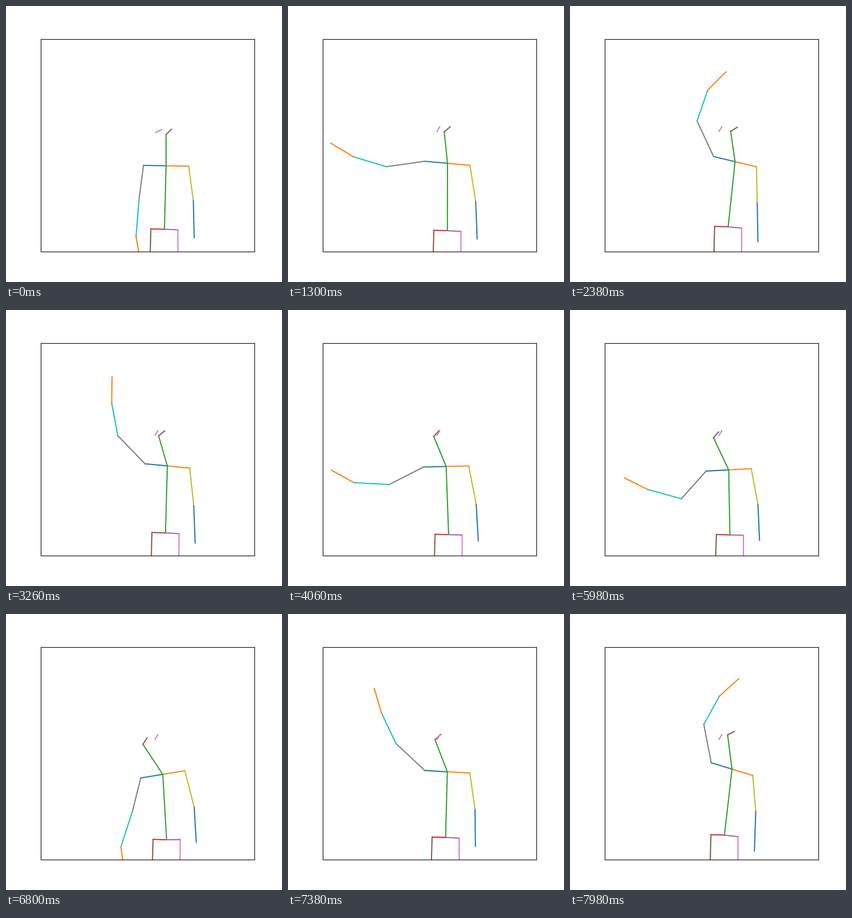
Recreate the animation shown at these times as an HTML page with a canvas. Size 500 by 500 pixels, loop 8000 ms.

```html
<!DOCTYPE html>
<html lang="en">
<head>
<meta charset="utf-8">
<title>Skeleton motion</title>
<style>
  html, body { margin: 0; width: 100%; height: 100%; overflow: hidden; background: #fff; }
  canvas { display: block; width: 100%; height: 100%; }
</style>
</head>
<body>
<canvas id="stage" width="500" height="500"></canvas>
<script>
const ctx = document.getElementById('stage').getContext('2d');
const LOOP = 8000, STEP = 20, FLOOR = 450;
const BLUE = '#1f77b4', ORANGE = '#ff7f0e', GREEN = '#2ca02c', RED = '#d62728',
      PURPLE = '#9467bd', BROWN = '#8c564b', PINK = '#e377c2', GRAY = '#7f7f7f',
      OLIVE = '#bcbd22', CYAN = '#17becf';

const rad = deg => deg * Math.PI / 180;
const shift = ([x, y], dx, dy) => [x + dx, y + dy];

// Monotone cubic through (times, values), at rest at both ends.
function curve(times, values) {
  const last = times.length - 1;
  const slope = i => (values[i + 1] - values[i]) / (times[i + 1] - times[i]);
  const tangent = times.map((_, i) => {
    if (i === 0 || i === last) return 0;
    const a = slope(i - 1), b = slope(i);
    return a * b <= 0 ? 0 : 2 * a * b / (a + b);
  });
  return t => {
    let i = 0;
    while (i < last - 1 && t >= times[i + 1]) i++;
    const h = times[i + 1] - times[i];
    const u = Math.min(1, Math.max(0, (t - times[i]) / h)), v = 1 - u;
    return v * v * (1 + 2 * u) * values[i] + u * u * (3 - 2 * u) * values[i + 1]
         + h * u * v * (v * tangent[i] - u * tangent[i + 1]);
  };
}

// Key poses of the trunk; every other trunk joint follows from these.
const POSES = [0, 1300, 2380, 4060, 5160, 6800, 7980];
const track = (...values) => curve(POSES, values);
const hipX = track(287, 288.8, 286.5, 291, 288.3, 291, 279.8);
const hipY = track(404.5, 407, 400, 407, 406, 409, 400.5);
const neckX = track(290, 289, 299, 286.5, 291, 284, 293.5);
const neckY = track(289.5, 285, 282, 283.5, 288, 290.5, 281);
const headX = track(290, 283, 291, 264, 272, 248, 285.5);
const headY = track(233, 228, 227, 229, 227, 236, 219);
const roll = track(1, 5.2, 13.4, -1.4, 3.5, -9.4, 16.8);
const settle = curve([0, 1300], [0, 1]);

// Waving arm: time, then angles of upper arm, forearm and hand
// (0 down, 90 out to the side, 180 up).
const ARM = [
  [0, 7.4, 4.7, -9.5],
  [820, 25, 34, 34],
  [1300, 82, 107, 121],
  [1640, 128, 154, 162],
  [2380, 155, 199, 225],
  [3290, 135, 168, 179],
  [4060, 63, 93, 119],
  [4900, 60, 103, 128],
  [5160, 59, 147, 172],
  [5500, 57, 146, 172],
  [6800, 14, 18, -8],
  [7390, 134, 156, 165],
  [7980, 169, 209, 228]
];
const armTimes = ARM.map(key => key[0]);
const [upperArm, forearm, handTurn] = [1, 2, 3].map(c => curve(armTimes, ARM.map(key => key[c])));

const bone = (from, angle, length) =>
  shift(from, -Math.sin(rad(angle)) * length, Math.cos(rad(angle)) * length);

function pose(t) {
  const tilt = roll(t), hip = hipX(t);
  const neck = [neckX(t), neckY(t)];
  const head = [headX(t), headY(t)];
  const pelvis = [hip, hipY(t)];

  // Shoulders narrow as they roll.
  const width = 41 * Math.cos(rad(tilt));
  const dx = width * Math.cos(rad(tilt)), dy = width * Math.sin(rad(tilt));
  const shoulderL = shift(neck, -dx, -dy), shoulderR = shift(neck, dx, dy);

  // Resting arm hangs still and follows the hips a little.
  const elbowR = [340 + 0.4 * (hip - 288.5), 353 + 0.3 * tilt];
  const wristR = shift(elbowR, 1.5 + 0.55 * (hip - 287), 66 + 0.3 * tilt);

  // Foreshortening: the upper arm is short when down, the forearm when up.
  const a = upperArm(t), b = forearm(t);
  const elbowL = bone(shoulderL, a, 60 + 11 * Math.sin(rad(Math.min(a, 90))));
  const wristL = bone(elbowL, b, 68 - 0.045 * b);
  const handL = bone(wristL, handTurn(t), 47);

  const hipL = shift(pelvis, -24.5, -0.7);
  const hipR = shift(pelvis, 24.5, 0.8 + 0.12 * tilt);
  const gaze = rad(1.1 * tilt - 46);
  const brow = shift(head, 14 * Math.cos(gaze), 14 * Math.sin(gaze));
  const s = settle(t);
  const eyeIn = [271 - s, 229 - 2 * s], eyeOut = [282 - 7 * s, 224 - 5.5 * s];

  return { neck, head, brow, eyeIn, eyeOut, pelvis, hipL, hipR, shoulderL, shoulderR,
           elbowR, wristR, elbowL, wristL, handL,
           footL: [hipL[0] - 1.3, FLOOR], footR: [hipR[0], FLOOR] };
}

function line(color, ...points) {
  ctx.strokeStyle = color;
  ctx.beginPath();
  for (const [x, y] of points) ctx.lineTo(x, y);
  ctx.stroke();
}

function draw(t) {
  const p = pose(t);
  ctx.fillStyle = '#fff';
  ctx.fillRect(0, 0, 500, 500);

  ctx.save();
  ctx.beginPath();
  ctx.rect(63, 60, 387, 385);
  ctx.clip();
  ctx.lineWidth = 2.08;
  ctx.lineCap = 'square';
  ctx.lineJoin = 'round';
  line(BLUE, p.neck, p.shoulderL);
  line(ORANGE, p.neck, p.shoulderR);
  line(GREEN, p.head, p.neck, p.pelvis);
  line(RED, p.pelvis, p.hipL);
  line(PURPLE, p.pelvis, p.hipR);
  line(BROWN, p.head, p.brow);
  line(PINK, p.eyeIn, p.eyeOut);
  line(GRAY, p.shoulderL, p.elbowL);
  line(OLIVE, p.shoulderR, p.elbowR);
  line(CYAN, p.elbowL, p.wristL);
  line(BLUE, p.elbowR, p.wristR);
  line(ORANGE, p.wristL, p.handL);
  line(BROWN, p.hipL, p.footL);
  line(PINK, p.hipR, p.footR);
  ctx.restore();

  ctx.strokeStyle = '#000';
  ctx.lineWidth = 1.1;
  ctx.strokeRect(63.5, 60.5, 387, 385);
}

const start = performance.now();
function tick() {
  const t = (performance.now() - start) % LOOP;
  draw(Math.floor(t / STEP) * STEP);
  requestAnimationFrame(tick);
}
tick();
</script>
</body>
</html>
```
